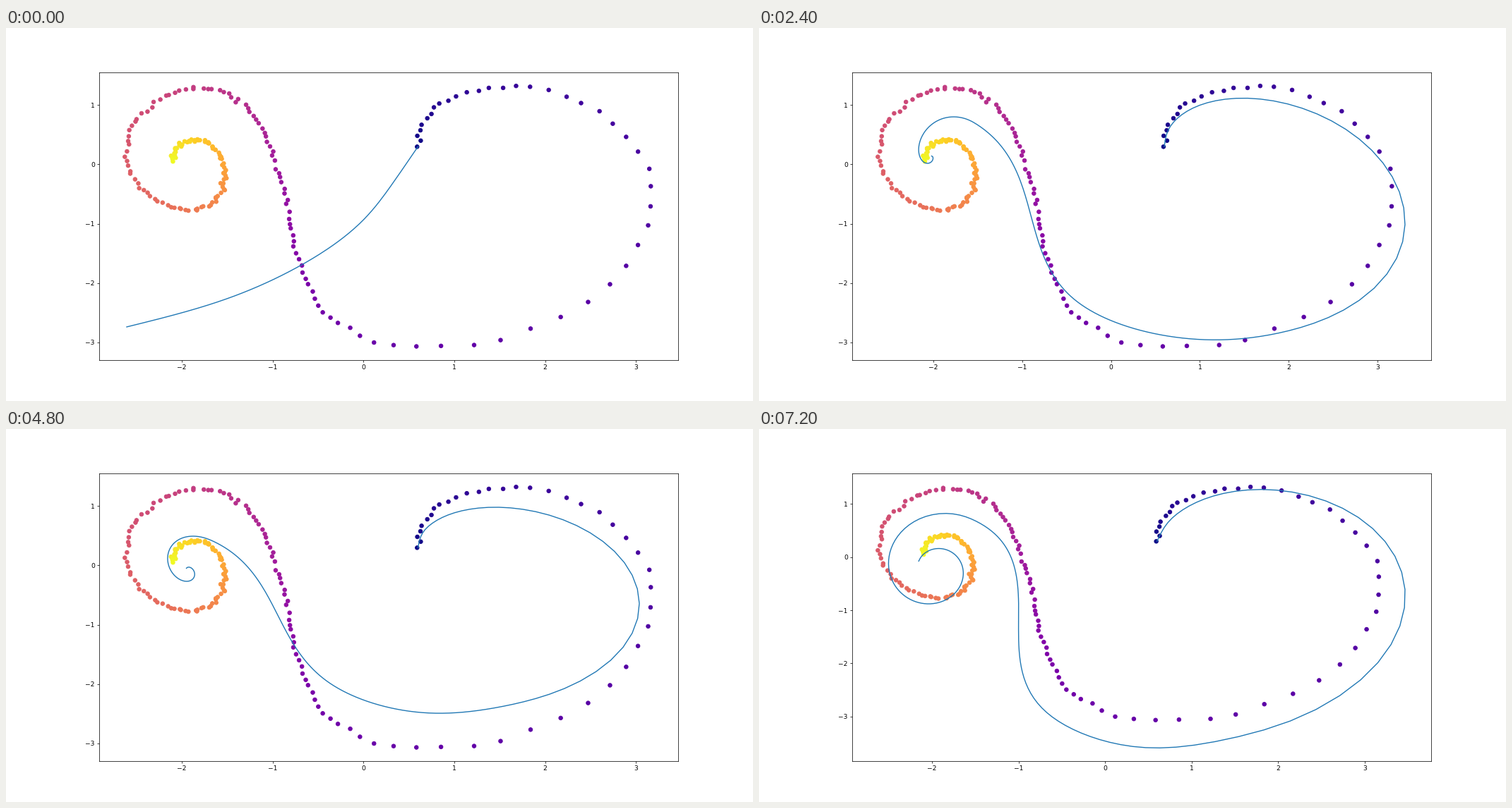
A matplotlib script for the animation above (8 s loop, 1058 by 529 pixels).

```python
import numpy as np
import matplotlib.pyplot as plt
from matplotlib.animation import FuncAnimation

STEP_MS = 400
STEPS = 20
STEPS_PER_FIT = 3

START = np.array([0.6, 0.3])
N_POINTS = 200
NOISE = 0.015
DATA_LOW = np.array([-2.617, -3.077])
DATA_HIGH = np.array([3.175, 1.324])
MARGIN = 0.05


def velocity(state):
    """Two linear spirals blended by a sigmoid in x."""
    inward = np.array([[-0.1, -0.5], [0.5, -0.1]])
    centre = np.array([-1.0, 0.0])
    blend = 1 / (1 + np.exp(-state @ centre))
    return (blend * inward @ (state - centre)
            - 2 * (1 - blend) * inward @ (state + centre))


def integrate(times):
    path = [START]
    for dt in np.diff(times):
        path.append(path[-1] + velocity(path[-1]) * dt)
    return np.array(path)


def arc_length(path):
    return np.r_[0, np.cumsum(np.hypot(*np.diff(path, axis=0).T))]


def spline(knots, progress):
    """Natural cubic spline through the knots, sampled at length fractions."""
    p = np.array(knots)
    t = arc_length(p)
    h = np.diff(t)
    n = len(t)
    system = np.eye(n)
    rhs = np.zeros_like(p)
    for i in range(1, n - 1):
        system[i, i - 1:i + 2] = h[i - 1], 2 * (h[i - 1] + h[i]), h[i]
        rhs[i] = 6 * ((p[i + 1] - p[i]) / h[i] - (p[i] - p[i - 1]) / h[i - 1])
    bend = np.linalg.solve(system, rhs)

    s = progress * t[-1]
    k = np.clip(np.searchsorted(t, s, side="right") - 1, 0, n - 2)
    a, b, w = (v[:, None] for v in (t[k + 1] - s, s - t[k], h[k]))
    return ((a**3 * bend[k] + b**3 * bend[k + 1]) / (6 * w)
            + (p[k] / w - bend[k] * w / 6) * a
            + (p[k + 1] / w - bend[k + 1] * w / 6) * b)


def spiral(first, second, ratio, reach, angles):
    """Shrinking spiral given two vertical extremes half a turn apart.

    Each half turn scales the size by ratio; reach sets the width.
    """
    decay = -np.log(ratio) / np.pi
    arm = np.subtract(first, second) / (1 + ratio)
    centre = first - arm
    cos, sin = np.cos(angles), np.sin(angles)
    shape = np.column_stack([arm[0] * cos - reach * sin,
                             arm[1] * (cos + decay * sin)])
    return centre + np.exp(-decay * angles)[:, None] * shape


def trained(lobe, knee, joint, coil, coil_end):
    """Growing right lobe, S-bend through two points, shrinking left coil."""
    unwinding = spiral(*lobe, np.linspace(4.2, 0, 16))
    winding = spiral(*coil, np.linspace(-0.5, coil_end, 32))
    return np.vstack([START, unwinding, knee, joint, winding])


untrained = [START, (0.323, -0.316), (0, -0.934), (-0.695, -1.706),
             (-1.526, -2.277), (-2.606, -2.74)]

narrow = trained(
    lobe=((0.77, -2.59), (1.45, 1.09), 0.4, -2.61),
    knee=(-0.306, -2.074), joint=(-0.586, -1.306),
    coil=((-1.899, 1.371), (-2.03, -0.706), 0.416, 0.87), coil_end=7.75)

curled = trained(
    lobe=((1.1, -2.957), (1.486, 1.116), 0.4, -3.0),
    knee=(-0.413, -2.277), joint=(-0.866, -1.065),
    coil=((-1.773, 0.801), (-2.067, 0.017), 0.158, 0.35), coil_end=6.3)

matching = trained(
    lobe=((0.6, -2.997), (1.574, 1.134), 0.4, -2.74),
    knee=(-0.407, -2.443), joint=(-0.76, -1.2),
    coil=((-1.883, 1.142), (-1.96, -0.627), 0.555, 0.755), coil_end=8.07)

shrunken = trained(
    lobe=((0.7, -2.487), (1.45, 0.98), 0.364, -2.935),
    knee=(-0.376, -1.98), joint=(-0.9, -0.97),
    coil=((-1.876, 0.492), (-1.946, -0.269), 0.315, 0.393), coil_end=7.18)

shallow = trained(
    lobe=((0.98, -2.135), (1.62, 1.095), 0.55, -1.98),
    knee=(0.127, -1.813), joint=(-0.528, -0.637),
    coil=((-1.759, 1.181), (-1.945, -1.077), 0.561, 0.99), coil_end=7.13)

wide = trained(
    lobe=((0.42, -3.582), (1.8, 1.274), 0.395, -3.275),
    knee=(-0.658, -2.95), joint=(-1.0, -1.55),
    coil=((-1.849, 0.823), (-2.04, -0.88), 0.612, 0.685), coil_end=7.51)

times = np.linspace(0, 6.29 * 5, N_POINTS)
truth = integrate(times)
observed = truth + np.random.default_rng(4).normal(0, NOISE, truth.shape)

progress = arc_length(truth)
progress /= progress[-1]
fits = [spline(knots, progress) for knots in
        (untrained, narrow, curled, matching, shrunken, shallow, wide)]

fig, ax = plt.subplots(figsize=(16, 8), dpi=66.125)
ax.scatter(*observed.T, c=times, cmap="plasma")
line, = ax.plot([], [], lw=1.5)


def draw(step):
    fit = fits[step // STEPS_PER_FIT]
    line.set_data(*fit.T)
    low = np.minimum(DATA_LOW, fit.min(axis=0))
    high = np.maximum(DATA_HIGH, fit.max(axis=0))
    pad = MARGIN * (high - low)
    ax.set_xlim(low[0] - pad[0], high[0] + pad[0])
    ax.set_ylim(low[1] - pad[1], high[1] + pad[1])
    return line,


animation = FuncAnimation(fig, draw, frames=STEPS, interval=STEP_MS,
                          repeat=True, repeat_delay=0)
plt.show()
```
